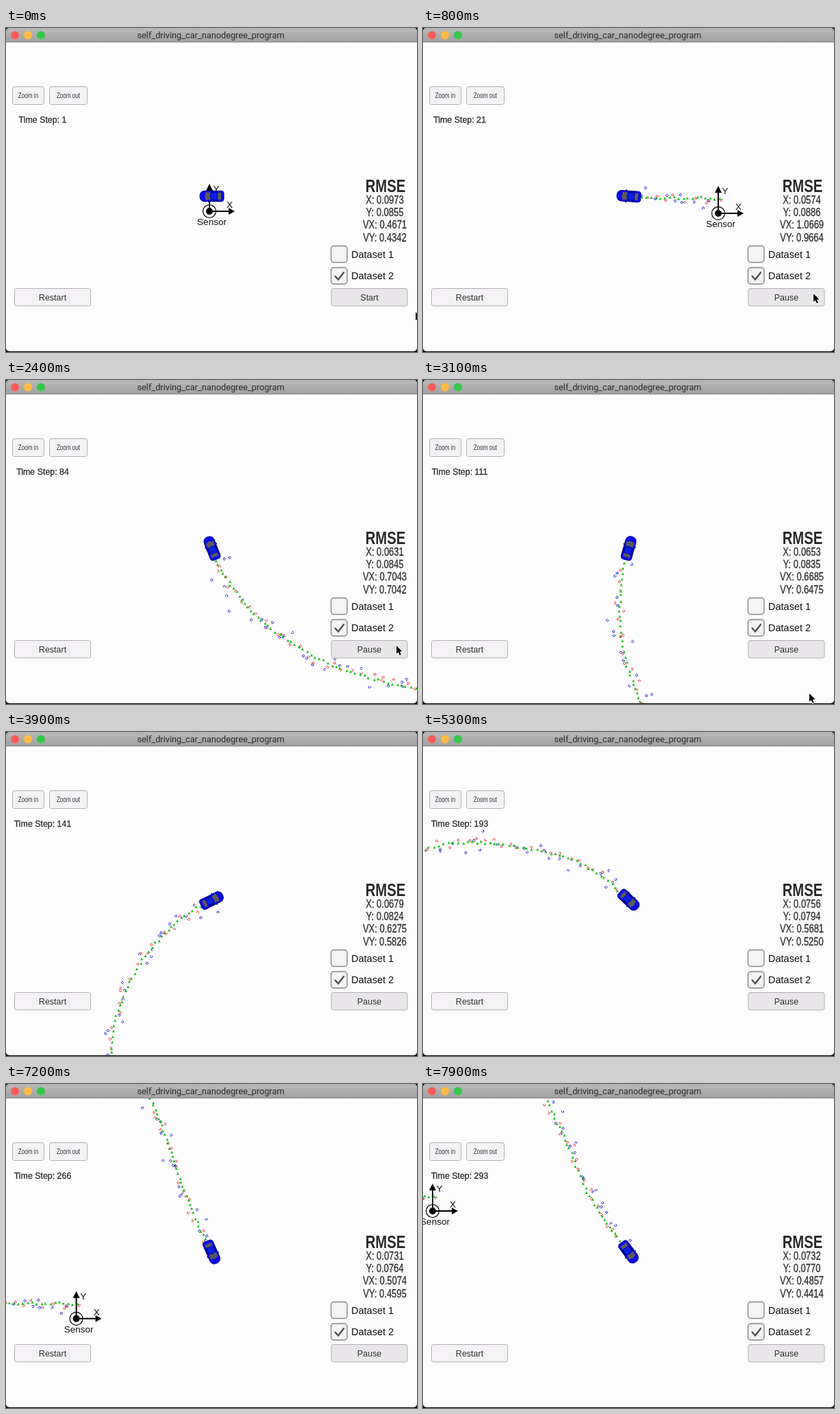
Recreate the animation shown at these times as an HTML page with a canvas. Size 600 by 472 pixels, loop 8 s.

```html
<!DOCTYPE html>
<html lang="en">
<head>
<meta charset="utf-8">
<title>Tracking simulator</title>
<style>
  html, body { margin: 0; width: 100%; height: 100%; overflow: hidden; background: #000; }
  canvas { display: block; }
</style>
</head>
<body>
<canvas id="stage" width="600" height="472"></canvas>
<script>
const ctx = document.getElementById('stage').getContext('2d');
const LOOP = 8000, TICK = 100, CAR_X = 300, CAR_Y = 245, CLICK = 260;
const SANS = '"Liberation Sans", Arial, sans-serif';

// Each stage: time, time step, RMSE of X, Y, VX, VY, and the way there,
// as points relative to the sensor that are evenly spaced in time.
const stages = [
  { t: CLICK, step: 1, rmse: [.06, .09, 1.2, 1.1], way: [[3, -22]] },
  { t: 1500, step: 48, rmse: [.0541, .0868, .8944, .7931], way: [[-102, -23], [-207, -35], [-312, -68]] },
  { t: 2400, step: 84, rmse: [.0631, .0845, .7043, .7042], way: [[-383, -109], [-442, -165], [-482, -235]] },
  { t: 3900, step: 141, rmse: [.0679, .0824, .6275, .5826], way: [[-503, -337], [-486, -445], [-429, -534], [-355, -588]] },
  { t: 5300, step: 193, rmse: [.0756, .0794, .5681, .5250], way: [[-268, -609], [-181, -602], [-95, -579], [-26, -525]] },
  { t: 6500, step: 238, rmse: [.0731, .0759, .5291, .4776], way: [[40, -451], [88, -364], [128, -274]] },
  { t: 7900, step: 293, rmse: [.0732, .0770, .4857, .4414], way: [[157, -187], [196, -100], [233, -14], [286, 60]] }
];
const IDLE_RMSE = [.0973, .0855, .4671, .4342];
const LAST = stages[stages.length - 1].step;

const mix = (a, b, u) => a + (b - a) * u;
const clamp = u => Math.max(0, Math.min(1, u));

// Step and errors at time t.
function status(t) {
  if (t < CLICK) return { step: 1, rmse: IDLE_RMSE };
  const i = Math.max(1, stages.findIndex(s => s.t >= t));
  const a = stages[i - 1], b = stages[i], u = (t - a.t) / (b.t - a.t);
  return { step: Math.round(mix(a.step, b.step, u)), rmse: a.rmse.map((v, k) => mix(v, b.rmse[k], u)) };
}

// Spline knots [step, x, y].
const knots = stages.flatMap(({ step, way }, i) => {
  const from = i ? stages[i - 1].step : step;
  return way.map((p, k) => [mix(from, step, (k + 1) / way.length), ...p]);
});

function slope(i, k) {
  const a = knots[Math.max(0, i - 1)], b = knots[Math.min(knots.length - 1, i + 1)];
  return (b[k] - a[k]) / (b[0] - a[0]);
}

function place(step) {
  let i = 0;
  while (i < knots.length - 2 && knots[i + 1][0] < step) i++;
  const a = knots[i], b = knots[i + 1], h = b[0] - a[0], u = (step - a[0]) / h;
  return [1, 2].map(k =>
    a[k] * (1 + 2 * u) * (1 - u) ** 2 + b[k] * u * u * (3 - 2 * u) +
    h * (slope(i, k) * u * (1 - u) ** 2 - slope(i + 1, k) * u * u * (1 - u)));
}

function random(n) {
  const v = Math.sin(n * 12.9898) * 43758.5453;
  return v - Math.floor(v);
}
const noise = n => (random(n) + random(n + .31) + random(n + .67) - 1.5) * 2;

// One estimate per step; the two sensors measure in turn.
const marks = Array.from({ length: LAST }, (_, i) => {
  const n = i + 1, [x, y] = place(n), laser = n % 2, spread = laser ? 4 : 9;
  return {
    x: x + noise(n + 1000), y: y + noise(n + 2000),
    mx: x + noise(n + 3000) * spread, my: y + noise(n + 4000) * spread,
    color: laser ? '#e02828' : '#1414c4',
    from: random(n + 5000) * 6.28, sweep: 4.5 + random(n + 6000) * 1.8
  };
});

function trace(points) {
  ctx.beginPath();
  for (let i = 0; i < points.length; i += 2) ctx.lineTo(points[i], points[i + 1]);
}

function polygon(points, fill) {
  trace(points);
  ctx.fillStyle = fill;
  ctx.fill();
}

function stroke(color, width) {
  ctx.strokeStyle = color;
  ctx.lineWidth = width;
  ctx.stroke();
}

function line(points, color, width) {
  trace(points);
  stroke(color, width);
}

function arc(x, y, r, from = 0, sweep = 7) {
  ctx.beginPath();
  ctx.arc(x, y, r, from, from + sweep);
}

function disc(x, y, r, fill) {
  arc(x, y, r);
  ctx.fillStyle = fill;
  ctx.fill();
}

function box(x, y, w, h, r, fill, edge, width = 1) {
  ctx.beginPath();
  ctx.roundRect(x, y, w, h, r);
  ctx.fillStyle = fill;
  ctx.fill();
  if (edge) stroke(edge, width);
}

// Squeezed labels share one horizontal scale; heavy ones get a thin outline.
function text(str, x, y, size, { color = '#323232', align = 'center', squeezed, heavy, weight = '', family = SANS } = {}) {
  ctx.save();
  ctx.translate(x, y);
  if (squeezed) ctx.scale(.81, 1);
  ctx.font = `${weight} ${size}px ${family}`;
  ctx.textAlign = align;
  ctx.fillStyle = ctx.strokeStyle = color;
  ctx.lineWidth = .35;
  ctx.fillText(str, 0, 0);
  if (heavy) ctx.strokeText(str, 0, 0);
  ctx.restore();
}

function drawMarks(step) {
  for (const m of marks.slice(0, step)) {
    arc(m.mx, m.my, 1.6, m.from, m.sweep);
    stroke(m.color, 1);
    polygon([m.x - 2, m.y + 1.8, m.x, m.y - 2, m.x + 2, m.y + 1.8], '#14c014');
  }
}

function drawSensor() {
  const ink = { color: '#111' };
  arc(0, 0, 9.5);
  stroke('#000', 1.2);
  disc(0, 0, 5, '#000');
  line([0, -32, 0, 0, 30, 0], '#000', 2);
  polygon([37, 0, 28, -5, 28, 5], '#000');
  polygon([0, -40, -5, -30, 5, -30], '#000');
  text('X', 29.5, -5, 13.5, ink);
  text('Y', 10, -28, 13.5, ink);
  text('Sensor', 3.5, 20, 13.5, ink);
}

function drawCar(angle) {
  ctx.save();
  ctx.translate(CAR_X + .5, CAR_Y);
  ctx.rotate(angle);
  line([4, -9.5, 4, 9.5], '#000050', 1.6);
  box(-17.5, -7.8, 35, 15.6, [4, 7, 7, 4], '#0808f0', '#000078');
  box(-8, -5, 10, 10, 2, '#0a20e0', '#0000a0', .8);
  polygon([2, -5, 9, -6, 10.5, 0, 9, 6, 2, 5, 3, 0], '#5a5a5c');
  polygon([-8.5, -4.5, -13.5, -5.5, -13.5, 5.5, -8.5, 4.5], '#5a5a5c');
  for (const y of [-6.4, 6.4]) line([-8, y, 2, y], '#000070', 1);
  ctx.restore();
}

function button(label, x, y, w, h, { fill = '#f4f2f5', size = 12.5, squeezed } = {}) {
  box(x, y, w, h, 3, fill, '#b0aeb1');
  text(label, x + w / 2, y + h / 2 + size * .36, size, { squeezed });
}

function drawControls({ step, rmse }, running) {
  const small = { size: 10, squeezed: true };
  button('Zoom in', 9.5, 85.5, 46, 26, small);
  button('Zoom out', 63.5, 85.5, 55, 26, small);
  button('Restart', 12.5, 379.5, 111, 25.5);
  button(running ? 'Pause' : 'Start', 475, 379.5, 111, 25.5, { fill: '#e8e6e9' });
  text('Time Step: ' + step, 53.5, 138, 12.4, { heavy: true });

  for (const i of [0, 1]) {
    const y = 317.5 + i * 31.5;
    box(474.5, y, 23.5, 24, 4, '#f5f3f6', '#858386', 1.4);
    text(`Dataset ${i + 1}`, 504, y + 17, 14.5, { align: 'left', color: '#111' });
  }
  line([480, 361, 485, 366.5, 493.5, 355.5], '#4a4a4a', 2.3);

  text('RMSE', 554, 239, 25, { weight: 'bold', squeezed: true, color: '#2a2a2a' });
  ['X', 'Y', 'VX', 'VY'].forEach((name, i) =>
    text(`${name}: ${rmse[i].toFixed(4)}`, 553, 256 + 18.2 * i, 16, { squeezed: true, heavy: true }));
}

function drawTitleBar() {
  const shade = ctx.createLinearGradient(0, 0, 0, 20);
  shade.addColorStop(0, '#b8b8b8');
  shade.addColorStop(1, '#a2a2a2');
  box(0, 0, 600, 20, [5, 5, 0, 0], shade);
  line([0, 20.5, 600, 20.5], '#868686', 1);
  ['#fc5b57', '#fdbc40', '#34c84a'].forEach((color, i) => disc(13 + i * 19, 10.5, 6, color));
  text('self_driving_car_nanodegree_program', 299, 15, 12.75, { color: '#2c2c2c', family: 'Roboto, sans-serif' });
}

// The pointer comes in from the right, clicks, rests and leaves downwards.
function drawPointer(t) {
  const enter = clamp(t / 200), leave = clamp((t - 2800) / 400);
  const shape = [0, 0, 0, 12, 2.7, 9.5, 4.8, 14, 6.8, 13, 4.8, 8.7, 8.5, 8.5, 0, 0];
  ctx.save();
  ctx.translate(mix(598, 570, enter) - 8 * leave, mix(414, 387, enter) + 93 * leave);
  line(shape, '#fff', 2);
  polygon(shape, '#000');
  ctx.restore();
}

function draw(t) {
  const now = status(t), { step } = now;
  const [x, y] = place(step);
  const [bx, by] = place(Math.max(1, step - 2)), [ax, ay] = place(Math.max(3, step));
  ctx.fillStyle = '#000';
  ctx.fillRect(0, 0, 600, 472);
  box(0, 0, 600, 471, 5, '#fefdfe');
  ctx.save();
  ctx.clip();
  ctx.translate(CAR_X - x, CAR_Y - y);
  drawMarks(step);
  drawSensor();
  ctx.restore();
  drawCar(Math.atan2(ay - by, ax - bx));
  drawControls(now, t >= CLICK);
  drawTitleBar();
  drawPointer(t);
}

const start = performance.now();
function tick() {
  const t = (performance.now() - start) % LOOP;
  draw(Math.floor(t / TICK) * TICK);
  requestAnimationFrame(tick);
}
tick();
</script>
</body>
</html>
```
